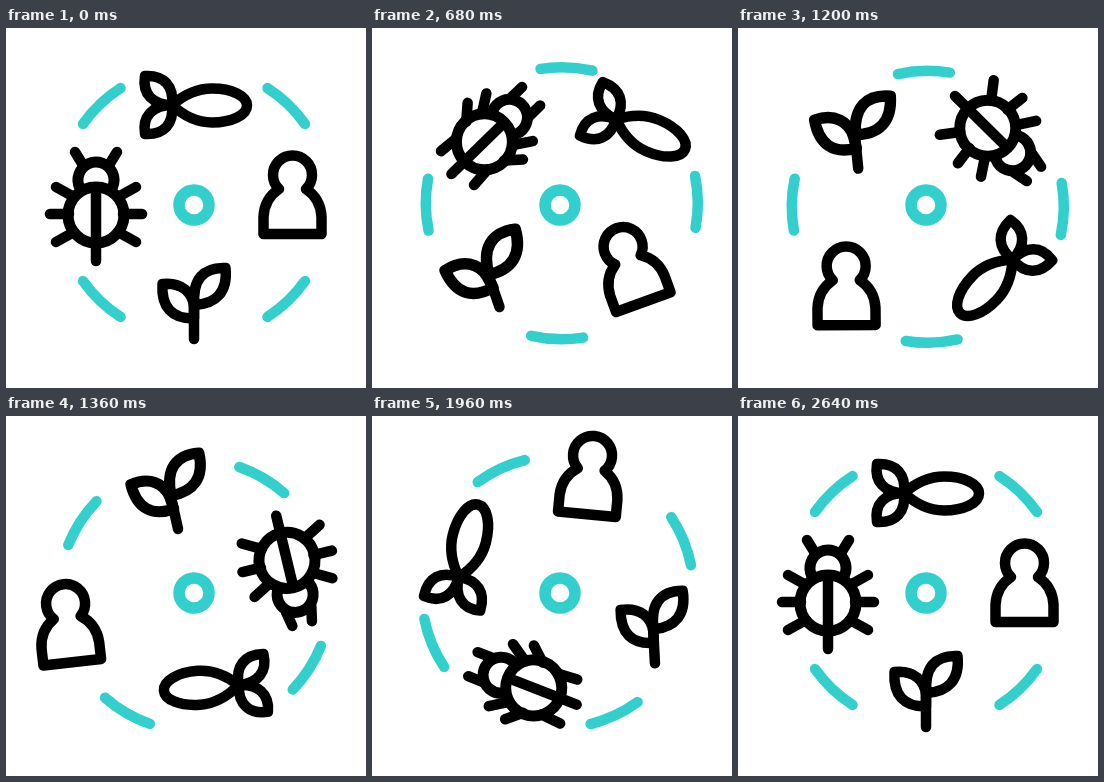
These frames come from a looping animation (360x360 px, 3000 ms). An HTML page with a canvas:

```html
<!DOCTYPE html>
<html lang="en">
<head>
<meta charset="utf-8">
<title>Food chain</title>
<style>
  html, body { margin: 0; width: 100%; height: 100%; overflow: hidden; background: #fff; }
  canvas { display: block; width: 100vw; height: 100vh; }
</style>
</head>
<body>
<canvas id="stage" width="360" height="360"></canvas>
<script>
const ctx = document.getElementById('stage').getContext('2d');
const LOOP = 3000, STEP = 40, START = 80, END = 2640, SWING = 1280;
const TEAL = '#33cfcd', BLACK = '#000';
const CX = 188, CY = 177;
const rad = deg => deg * Math.PI / 180;

// Smooth curve through [time, value] keys, at rest at both ends.
function track(...inner) {
  const keys = [[START, 0], ...inner];
  const slope = i => (keys[i + 1][1] - keys[i][1]) / (keys[i + 1][0] - keys[i][0]);
  const gap = i => keys[i + 1][0] - keys[i][0];
  const tangents = keys.map((_, i) => i === 0 || i === keys.length - 1 ? 0 :
    (slope(i - 1) * gap(i) + slope(i) * gap(i - 1)) / (gap(i - 1) + gap(i)));
  return time => {
    const t = Math.min(Math.max(time, START), END);
    let i = 0;
    while (i < keys.length - 2 && t > keys[i + 1][0]) i++;
    const h = gap(i), u = (t - keys[i][0]) / h, v = 1 - u;
    return keys[i][1] * v * v * (1 + 2 * u) + keys[i + 1][1] * u * u * (3 - 2 * u) +
      h * u * v * (v * tangents[i] - u * tangents[i + 1]);
  };
}

const orbit = track([680, 45.7], [1000, 97.3], [1360, 166.5], [1640, 225], [1960, 291.3], [END, 360]);
const fishSway = track([680, -22.5], [1000, -14], [1360, 9], [1640, 13.5], [1960, -6.8], [END, 0]);
const plantTilt = track([680, -19], [1000, 0], [1360, -12.5], [1640, -15], [1960, -3], [END, 0]);
const leafSpread = track([680, 0.9], [1000, 1], [1360, 0.55], [1640, 0.1], [1960, 0], [END, 0]);
const personTilt = track([680, -20], [1000, 5], [1360, -6.5], [1640, -2], [1960, 5.5], [END, 0]);
const personPush = track([680, 0], [1000, 4.3], [1360, 35], [1640, 37], [1960, 17.5], [END, 0]);
const personDrift = track([680, 0], [1000, 3], [1360, -2], [1640, -4], [1960, -10], [END, 0]);
const antennaFold = track([680, 1], [1960, 1], [END, 0]);

function legSwing(time) {
  if (time < START || time > END) return 0;
  return (1 - Math.cos(2 * Math.PI * (time - START) / SWING)) / 2;
}

function scoped(draw) {
  ctx.save();
  draw();
  ctx.restore();
}

function turn(x, y, deg, scale = 1) {
  ctx.translate(x, y);
  ctx.rotate(rad(deg));
  ctx.scale(scale, scale);
  ctx.translate(-x, -y);
}

function stroke(path, width = 10.5, color = BLACK) {
  ctx.lineWidth = width;
  ctx.strokeStyle = color;
  ctx.stroke(new Path2D(path));
}

function ring(x, y, r, width, color, from = 0, to = 360) {
  ctx.beginPath();
  ctx.arc(x, y, r, rad(from), rad(to));
  ctx.lineWidth = width;
  ctx.strokeStyle = color;
  ctx.stroke();
}

// A short limb from (x, y) along (dx, dy), swung about its root.
function limb(x, y, dx, dy, deg) {
  scoped(() => {
    turn(x, y, deg);
    stroke(`M${x} ${y}l${dx} ${dy}`);
  });
}

function drawArcs() {
  for (const mid of [46.3, 133.7, 226.3, 313.7]) ring(188, 174.5, 136, 10.5, TEAL, mid - 11, mid + 11);
}

function drawBug(time) {
  const swing = legSwing(time), fold = antennaFold(time);
  ctx.translate(90, 187);
  for (const side of [-1, 1]) {
    limb(side * 22, -18, side * 18, -10, -side * 28 * swing);
    limb(side * 27, -1, side * 19, 0, -side * 49 * swing);
    limb(side * 22, 17, side * 18, 10, side * 57 * swing);
    limb(side * 13, -50, side * 8, -13, -side * 32 * fold);
  }
  ring(0, -35, 18, 11, BLACK, 155, 385);
  ring(0, 0, 28, 11, BLACK);
  stroke('M0 -27V46');
}

function drawFish(time) {
  turn(166, 77, fishSway(time));
  stroke('M166 77C180 65 193 60.5 206 60.5C226 60.5 241 68 241 77.5C241 87 226 94.5 206 94.5C193 94.5 180 90 166 77Z');
  stroke('M166 77C168 58 158 47 139 48C136 66 147 77 166 77Z');
  stroke('M166 77C168 96 158 107 139 106C136 88 147 77 166 77Z');
}

function drawPlant(time) {
  const spread = leafSpread(time), size = 1 + 0.1 * spread;
  turn(188, 277, plantTilt(time) - orbit(time));
  stroke('M188 311V277');
  scoped(() => {
    turn(188, 277, 10 * spread, size);
    stroke('M188.5 277C186 252 197 239 219.5 240C222 264 210 276 188.5 277Z');
  });
  scoped(() => {
    turn(188, 289, -10 * spread, size);
    stroke('M188 290.5C166 291 155 279 156.5 256C176 254 187 265 188 279Z');
  });
}

function drawPerson(time) {
  ctx.translate(personPush(time), personDrift(time));
  turn(285, 173, personTilt(time) - orbit(time));
  stroke('M257.5 206V189C258 177 264 167 273 161A19.5 19.5 0 1 1 300 161C309 167 315 177 315.5 189V206Z');
}

function render(now) {
  const time = Math.floor((now % LOOP) / STEP) * STEP;
  ctx.fillStyle = '#fff';
  ctx.fillRect(0, 0, 360, 360);
  ctx.lineCap = ctx.lineJoin = 'round';
  scoped(() => {
    turn(CX, CY, orbit(time));
    for (const part of [drawArcs, drawBug, drawFish, drawPlant, drawPerson]) scoped(() => part(time));
  });
  ring(CX, CY, 15, 11.5, TEAL);
}

let origin = null;
function tick(now) {
  if (origin === null) origin = now;
  render(now - origin);
  requestAnimationFrame(tick);
}
render(0);
requestAnimationFrame(tick);
</script>
</body>
</html>
```
